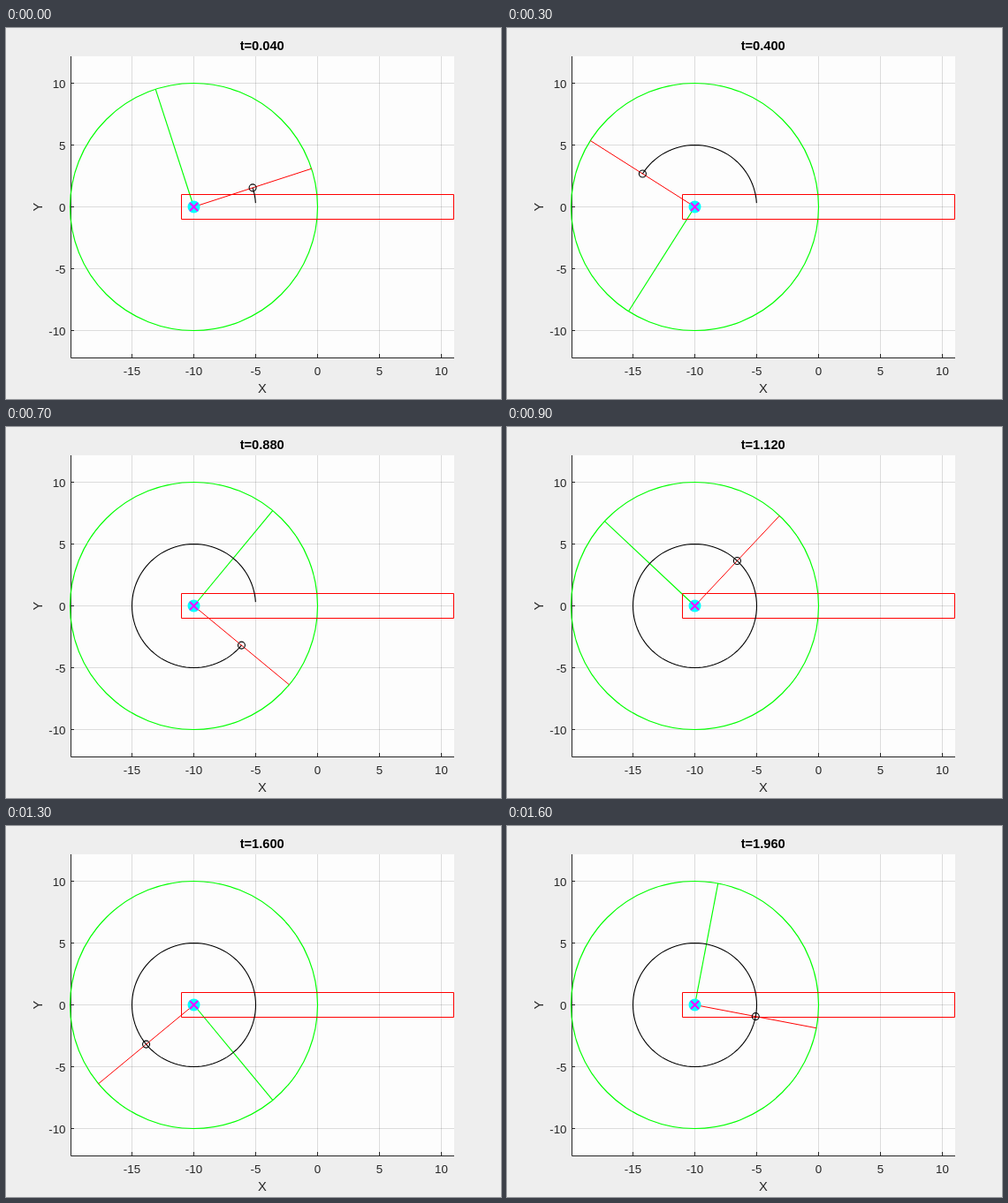
Recreate the animation shown at these times as an HTML page. Size 560 by 420 pixels, loop 1.7 s.

```html
<!DOCTYPE html>
<html lang="en">
<head>
<meta charset="utf-8">
<title>Rotating arm</title>
<style>
  html, body { margin: 0; width: 100%; height: 100%; overflow: hidden; background: #eee; }
  svg { display: block; width: 560px; height: 420px; font-family: "Liberation Sans", Arial, sans-serif; }
  text { fill: #262626; font-size: 13.33px; text-anchor: middle; }
  .label { font-size: 14.67px; }
  .title { font-size: 14.67px; font-weight: bold; fill: #000; }
  path, circle { fill: none; stroke-width: 1; }
  .grid { stroke: #262626; stroke-opacity: .15; }
  .axis { stroke: #262626; }
  .green { stroke: #0f0; stroke-width: 1.15; }
  .red { stroke: #f00; }
  .black { stroke: #000; stroke-width: 1.1; }
  .hub { fill: #0ff; }
  .cross { stroke: #f0f; stroke-width: 2; }
</style>
</head>
<body>
<svg viewBox="0 0 560 420">
  <rect width="560" height="420" fill="#eee"/>
  <rect x="73" y="32" width="434" height="342" fill="#fdfdfd"/>
  <path class="grid" id="grid"/>
  <path class="axis" id="axis"/>
  <g id="ticks"></g>
  <text class="title" id="title" x="289.7" y="25"></text>
  <text class="label" x="290" y="413">X</text>
  <text class="label" transform="translate(41 202.5) rotate(-90)">Y</text>
  <circle class="green" cx="212.5" cy="202.5" r="140"/>
  <path class="green" id="greenArm"/>
  <path class="red" d="M198.5 188.5H506.5V216.5H198.5Z"/>
  <path class="red" id="redArm"/>
  <path class="black" id="trace"/>
  <circle class="hub" cx="212.5" cy="202.5" r="7"/>
  <path class="cross" d="M208 198l9 9m0-9l-9 9"/>
  <circle class="black" id="marker" r="4"/>
</svg>
<script>
const LOOP = 1700, STEP = 100, UNIT = 14;
const CX = 212.5, CY = 202.5;
const byId = id => document.getElementById(id);
const setPath = (id, d) => byId(id).setAttribute('d', d);

// Plot coordinates to pixels
const px = x => 352.5 + x * UNIT;
const py = y => 202.5 - y * UNIT;

function addTick(text, x, y, anchor) {
  const el = document.createElementNS('http://www.w3.org/2000/svg', 'text');
  el.setAttribute('x', x);
  el.setAttribute('y', y);
  el.style.textAnchor = anchor;
  el.textContent = text;
  byId('ticks').append(el);
}

function drawAxes() {
  let grid = '', axis = 'M73.5 32V373.5H507';
  for (let v = -15; v <= 10; v += 5) {
    grid += `M${px(v)} 32V373`;
    axis += `M${px(v)} 373v-4`;
    addTick(v, px(v), 393, 'middle');
    if (v < -10) continue;
    grid += `M74 ${py(v)}H507`;
    axis += `M73 ${py(v)}h4`;
    addTick(v, 67.5, py(v) + 5, 'end');
  }
  setPath('grid', grid);
  setPath('axis', axis);
}

// One turn per unit of time, slightly ahead at the start
const angleAt = t => 2 * Math.PI * (t + 0.01);
const polar = (r, a) => [CX + r * UNIT * Math.cos(a), CY - r * UNIT * Math.sin(a)];
const arm = a => `M${CX} ${CY}L${polar(10, a)}`;

function trace(t) {
  const points = [];
  const n = Math.min(100, Math.round(t * 100));
  for (let i = 0; i <= n; i++) points.push(polar(5, angleAt(i / 100)));
  return 'M' + points.join('L');
}

let shown = -1;
function draw(now) {
  const step = Math.floor((now % LOOP) / STEP);
  if (step !== shown) {
    shown = step;
    const t = 0.04 + 0.12 * step;
    const a = angleAt(t);
    const [mx, my] = polar(5, a);
    byId('title').textContent = `t=${t.toFixed(3)}`;
    setPath('redArm', arm(a));
    setPath('greenArm', arm(a + Math.PI / 2));
    setPath('trace', trace(t));
    byId('marker').setAttribute('cx', mx);
    byId('marker').setAttribute('cy', my);
  }
}

function tick() {
  draw(performance.now());
  requestAnimationFrame(tick);
}

drawAxes();
draw(0);
requestAnimationFrame(tick);
</script>
</body>
</html>
```
